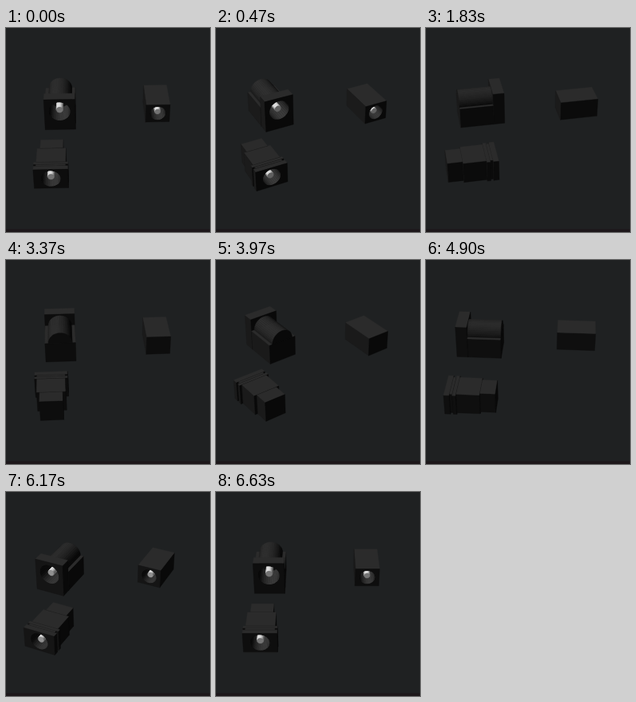
Write an HTML page with a canvas that moves like this. It is 256 by 256 pixels and loops after 6660 ms.

```html
<!DOCTYPE html>
<html lang="en">
<head>
<meta charset="utf-8">
<title>Rotating jacks</title>
<style>
  html, body { margin: 0; width: 100%; height: 100%; overflow: hidden; background: #1f2122; }
  canvas { display: block; width: 256px; height: 256px; }
</style>
</head>
<body>
<canvas id="stage"></canvas>
<script>
const LOOP = 6660, STEPS = 200;
const MID = 128, FOCAL = 950, PITCH = 34 * Math.PI / 180;
const SIN_P = Math.sin(PITCH), COS_P = Math.cos(PITCH);

const canvas = document.getElementById('stage');
const ctx = canvas.getContext('2d');
const ratio = window.devicePixelRatio || 1;
canvas.width = canvas.height = 256 * ratio;
ctx.scale(ratio, ratio);

// Profiles run counter-clockwise in the x/y plane and are extruded along z.
const rect = (w, y0, y1) => [[-w, y0], [w, y0], [w, y1], [-w, y1]];

function arc(r, cy, sweep, count) {
  const points = [];
  for (let i = 0; i <= count; i++) {
    const t = sweep * i / count;
    points.push([r * Math.cos(t), cy + r * Math.sin(t)]);
  }
  return points;
}

const circle = (r, cy) => arc(r, cy, 2 * Math.PI, 32).slice(0, -1);
const prism = (profile, z0, z1) => ({ profile, z0, z1 });

const jacks = [
  {
    cx: 68, cy: 93.8, front: 27.7,
    parts: [
      prism(rect(18.7, -21.8, 5.2), -27.7, 13.7),
      prism(arc(14.5, 5.2, Math.PI, 20), -27.7, 13.7),
      prism(rect(18.7, -21.8, 21.8), 13.7, 27.7)
    ],
    hole: { r: 13, y: 4.5, pin: 4 }
  },
  {
    cx: 188.5, cy: 94.5, front: 23.5,
    parts: [prism(rect(14.7, -12.4, 12.4), -23.5, 23.5)],
    hole: { r: 9.5, y: 0, pin: 3.5 }
  },
  {
    cx: 57.3, cy: 170, front: 31.5,
    parts: [
      prism(rect(14.3, -14.3, 14.3), -31.5, -12.5),
      prism(rect(18, -14.3, 14.3), -12.5, 16.5),
      prism(rect(21, -14.3, 14.3), 16.5, 21),
      prism(rect(18, -14.3, 14.3), 21, 24.5),
      prism(rect(21, -14.3, 14.3), 24.5, 31.5)
    ],
    hole: { r: 11.8, y: 0, pin: 4 }
  }
];

const plastic = v => v;
const lining = v => v * 1.25;
const metal = v => Math.min(235, 60 + v * 4);

function view(jack, angle) {
  const s = Math.sin(angle), c = Math.cos(angle);
  const up = jack.cy - MID;
  const eyeZ = (MID - jack.cx) * s + (FOCAL * COS_P - up * SIN_P) * c;

  function project([x, y, z]) {
    const wx = x * c + z * s;
    const wz = z * c - x * s;
    const k = FOCAL / (FOCAL - y * SIN_P - wz * COS_P);
    return [
      MID + (jack.cx - MID + wx) * k,
      MID + (up - y * COS_P + wz * SIN_P) * k
    ];
  }

  function shade(nx, ny, nz) {
    const wx = nx * c + nz * s;
    const wz = nz * c - nx * s;
    return Math.max(9, 8 + 35 * ny - 18 * wx + 6 * wz);
  }

  return { project, shade, eyeZ };
}

function trace(points) {
  ctx.beginPath();
  points.forEach(p => ctx.lineTo(p[0], p[1]));
  ctx.closePath();
}

function facesEye(points) {
  let area = 0;
  points.forEach((p, i) => {
    const q = points[(i + 1) % points.length];
    area += p[0] * q[1] - q[0] * p[1];
  });
  return area < 0;
}

function drawFace(cam, corners, normal, tone) {
  const points = corners.map(cam.project);
  if (!facesEye(points)) return;
  const v = Math.round(tone(cam.shade(...normal)));
  ctx.fillStyle = ctx.strokeStyle = `rgb(${v},${v},${v})`;
  ctx.lineWidth = 0.4;
  trace(points);
  ctx.fill();
  ctx.stroke();
}

function drawPrism(cam, { profile, z0, z1 }, tone, inside = false) {
  const flip = inside ? -1 : 1;
  profile.forEach(([ax, ay], i) => {
    const [bx, by] = profile[(i + 1) % profile.length];
    const len = Math.hypot(bx - ax, by - ay);
    const quad = [[ax, ay, z1], [ax, ay, z0], [bx, by, z0], [bx, by, z1]];
    if (inside) quad.reverse();
    drawFace(cam, quad, [flip * (by - ay) / len, flip * (ax - bx) / len, 0], tone);
  });
  const cap = z => profile.map(([x, y]) => [x, y, z]);
  if (inside) {
    drawFace(cam, cap(z0), [0, 0, 1], tone);
  } else {
    drawFace(cam, cap(z1), [0, 0, 1], tone);
    drawFace(cam, cap(z0).reverse(), [0, 0, -1], tone);
  }
}

function drawHole(cam, { r, y, pin }, front) {
  const ring = circle(r, y);
  const rim = ring.map(([x, py]) => cam.project([x, py, front]));
  if (!facesEye(rim)) return;
  ctx.save();
  trace(rim);
  ctx.clip();
  drawPrism(cam, prism(ring, front - 32, front), lining, true);
  drawPrism(cam, prism(circle(pin, y), front - 32, front - 4), metal);
  ctx.restore();
}

function drawJack(jack, angle) {
  const cam = view(jack, angle);
  const gap = p => Math.max(p.z0 - cam.eyeZ, cam.eyeZ - p.z1, 0);
  [...jack.parts]
    .sort((a, b) => gap(b) - gap(a))
    .forEach(part => {
      drawPrism(cam, part, plastic);
      if (part.z1 === jack.front) drawHole(cam, jack.hole, jack.front);
    });
}

function draw(time) {
  const step = Math.floor((time % LOOP + 3.4) / (LOOP / STEPS));
  const angle = (step + 1) / STEPS * 2 * Math.PI;
  ctx.fillStyle = '#1f2122';
  ctx.fillRect(0, 0, 256, 256);
  ctx.fillStyle = '#1d171a';
  ctx.fillRect(0, 252.5, 256, 3.5);
  jacks.forEach(jack => drawJack(jack, angle));
}

const start = performance.now();
function tick() {
  draw(performance.now() - start);
  requestAnimationFrame(tick);
}
tick();
</script>
</body>
</html>
```
